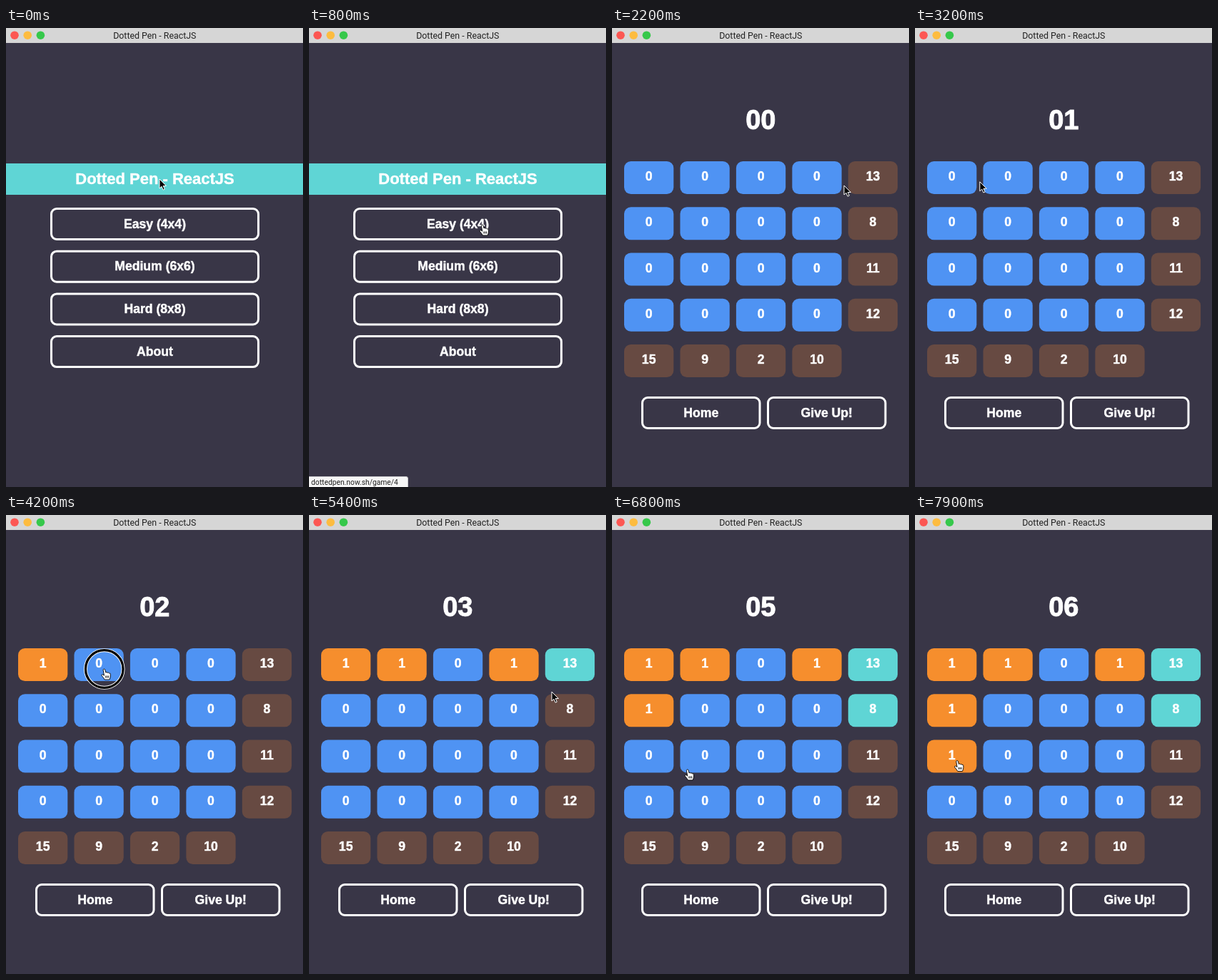
Write an HTML page that moves like this. It is 416 px wide and 644 px high and loops after 8000 ms.

```html
<!DOCTYPE html>
<html lang="en">
<head>
<meta charset="utf-8">
<title>Dotted Pen - ReactJS</title>
<style>
  html, body { margin: 0; width: 100%; height: 100%; overflow: hidden; background: #393647; }
  svg { display: block; width: 416px; height: 644px; }
  text { font: bold 17.6px "Liberation Sans", Arial, sans-serif; fill: #fff; stroke: #fff; stroke-width: .45; text-anchor: middle; }
  .ui { font-family: Roboto, sans-serif; font-weight: normal; fill: #222; stroke: none; }
  .btn { fill: none; stroke: #fff; stroke-width: 3; }
</style>
</head>
<body>
<svg id="stage" viewBox="0 0 416 644"></svg>
<script>
const LOOP = 8000, STEP = 100, GAME_START = 1600;
const BLUE = '#4f93f3', ORANGE = '#f68e2d', BROWN = '#674a42', TEAL = '#5fd5d5';
const TITLE = 'Dotted Pen - ReactJS';
const levels = ['Easy (4x4)', 'Medium (6x6)', 'Hard (8x8)', 'About'];
const rowSums = [13, 8, 11, 12], colSums = [15, 9, 2, 10];

const cellBox = (row, col) => ({ x: 17 + col * 78.45, y: 187 + row * 64.25, w: 69.3, h: 46 });
const menuBox = i => ({ x: 62, y: 252 + i * 59.7, w: 293, h: 46 });

// cells clicked during play, with the time each one flips
const clicks = [
  { at: 3500, row: 0, col: 0 }, { at: 4300, row: 0, col: 1 }, { at: 4900, row: 0, col: 3 },
  { at: 6100, row: 1, col: 0 }, { at: 7900, row: 2, col: 0 }
];
const presses = [1500, ...clicks.map(c => c.at)];

// the pointer wanders between these stops and rests on each clicked cell
const stops = [
  [0, 215, 212], [800, 243, 276], [1700, 243, 276], [2200, 325, 221], [2600, 362, 214],
  [5400, 340, 248], [6400, 392, 274], [6800, 106, 357], [7000, 106, 357]
];
const path = stops.concat(clicks.flatMap(({ at, row, col }) => {
  const { x, y } = cellBox(row, col);
  return [at - 150, at].map(t => [t, x + 42.3, y + 29]);
})).sort((a, b) => a[0] - b[0]);
path.push([LOOP, ...path[path.length - 1].slice(1)]);

const svg = document.getElementById('stage');
function add(parent, tag, attrs, text) {
  const el = document.createElementNS('http://www.w3.org/2000/svg', tag);
  for (const k in attrs) el.setAttribute(k, attrs[k]);
  if (text !== undefined) el.textContent = text;
  parent.appendChild(el);
  return el;
}
const show = (el, on) => el.setAttribute('visibility', on ? 'visible' : 'hidden');

function button(parent, { x, y, w, h }, label) {
  add(parent, 'rect', { x: x + 1.5, y: y + 1.5, width: w - 3, height: h - 3, rx: 7.5, class: 'btn' });
  add(parent, 'text', { x: x + w / 2, y: y + 28.5 }, label);
}

function cell(row, col, fill, label) {
  const { x, y, w, h } = cellBox(row, col);
  const box = add(game, 'rect', { x, y, width: w, height: h, rx: 9.5, fill });
  const text = add(game, 'text', { x: x + w / 2, y: y + 27 }, label);
  return { box, text };
}

add(svg, 'rect', { width: 416, height: 644, fill: '#393647' });

const menu = add(svg, 'g');
add(menu, 'rect', { y: 190, width: 416, height: 44, fill: TEAL });
add(menu, 'text', { x: 208.5, y: 219, style: 'font-size:22px' }, TITLE);
levels.forEach((label, i) => button(menu, menuBox(i), label));

const game = add(svg, 'g');
const counter = add(game, 'text', { x: 208.3, y: 142.2, style: 'font-size:38px;stroke-width:.9' });
const bits = rowSums.map((_, r) => colSums.map((_, c) => cell(r, c, BLUE, 0)));
const sums = rowSums.map((n, r) => cell(r, 4, BROWN, n));
colSums.forEach((n, c) => cell(4, c, BROWN, n));
['Home', 'Give Up!'].forEach((label, i) =>
  button(game, { x: 41 + i * 176, y: 517, w: 167.5, h: 46 }, label));

add(svg, 'rect', { width: 416, height: 21, fill: '#d6d6d6' });
['#fc5753', '#fdbc40', '#36c84b'].forEach((fill, i) =>
  add(svg, 'circle', { cx: 12 + i * 18.2, cy: 10.2, r: 5.8, fill }));
add(svg, 'text', { x: 208.3, y: 14.7, class: 'ui', style: 'font-size:12.4px' }, TITLE);

const status = add(svg, 'g');
add(status, 'path', { d: 'M-1 629.5H136Q138.5 629.5 138.5 632V645H-1Z', fill: '#f6f6f6', stroke: '#c4c4c8' });
add(status, 'text', { x: 3, y: 640.8, class: 'ui', style: 'font-size:10.3px;text-anchor:start' }, 'dottedpen.now.sh/game/4');

const pointer = add(svg, 'g');
const ring = add(pointer, 'g', { fill: 'none' });
add(ring, 'circle', { r: 26.3, stroke: '#fff', 'stroke-width': 5 });
add(ring, 'circle', { r: 26.3, stroke: '#000', 'stroke-width': 3.2 });
const arrow = add(pointer, 'path', {
  d: 'M0 0V13L3 10.3L5.1 15.2L7.3 14.2L5.2 9.5H9.4Z',
  fill: '#000', stroke: '#fff', 'stroke-linejoin': 'round'
});
const hand = add(pointer, 'g', { stroke: '#000', 'stroke-width': 0.9, 'stroke-linejoin': 'round' });
add(hand, 'path', {
  d: 'M-1.6 1.3C-1.6 -.2 .6 -.4 1 1L2 5Q3.5 3.7 4.3 5.3Q6 4.5 6.6 5.9Q8.5 5.6 8.5 7.2V10Q8.4 12 7.2 15H.4Q-.4 13.2 -3.7 9.3C-4.4 8.2 -3 7.2 -1.8 8L-.3 9.2Z',
  fill: '#fff'
});
add(hand, 'path', { d: 'M1.9 9.5v3m1.9 -3v3m1.9 -3v3', fill: 'none' });

function clickable(px, py, playing) {
  const boxes = playing
    ? bits.flatMap((line, r) => line.map((_, c) => cellBox(r, c)))
    : levels.map((_, i) => menuBox(i));
  return boxes.some(({ x, y, w, h }) => px >= x && px <= x + w && py >= y && py <= y + h);
}

function pointerAt(t) {
  const i = Math.max(1, path.findIndex(p => p[0] > t));
  const [t0, x0, y0] = path[i - 1], [t1, x1, y1] = path[i];
  const k = (t - t0) / (t1 - t0), e = k * k * (3 - 2 * k);
  return [x0 + (x1 - x0) * e, y0 + (y1 - y0) * e];
}

function render(t) {
  const playing = t >= GAME_START;
  show(menu, !playing);
  show(game, playing);
  show(status, t >= 800 && t < 1900);

  const seconds = Math.max(0, Math.floor((t - GAME_START) / 1000));
  counter.textContent = String(seconds).padStart(2, '0');

  const values = rowSums.map(() => [0, 0, 0, 0]);
  for (const { at, row, col } of clicks) if (t >= at) values[row][col] = 1;
  values.forEach((line, r) => {
    line.forEach((v, c) => {
      bits[r][c].box.setAttribute('fill', v ? ORANGE : BLUE);
      bits[r][c].text.textContent = v;
    });
    const total = line.reduce((sum, v) => sum * 2 + v, 0);
    sums[r].box.setAttribute('fill', total === rowSums[r] ? TEAL : BROWN);
  });

  const [x, y] = pointerAt(t);
  const over = clickable(x, y, playing);
  pointer.setAttribute('transform', `translate(${x.toFixed(2)} ${y.toFixed(2)})`);
  show(arrow, !over);
  show(hand, over);
  show(ring, presses.some(at => t >= at - STEP && t < at));
}

const start = performance.now();
function frame() {
  const t = (performance.now() - start) % LOOP;
  render(Math.floor(t / STEP) * STEP);
  requestAnimationFrame(frame);
}
frame();
</script>
</body>
</html>
```
